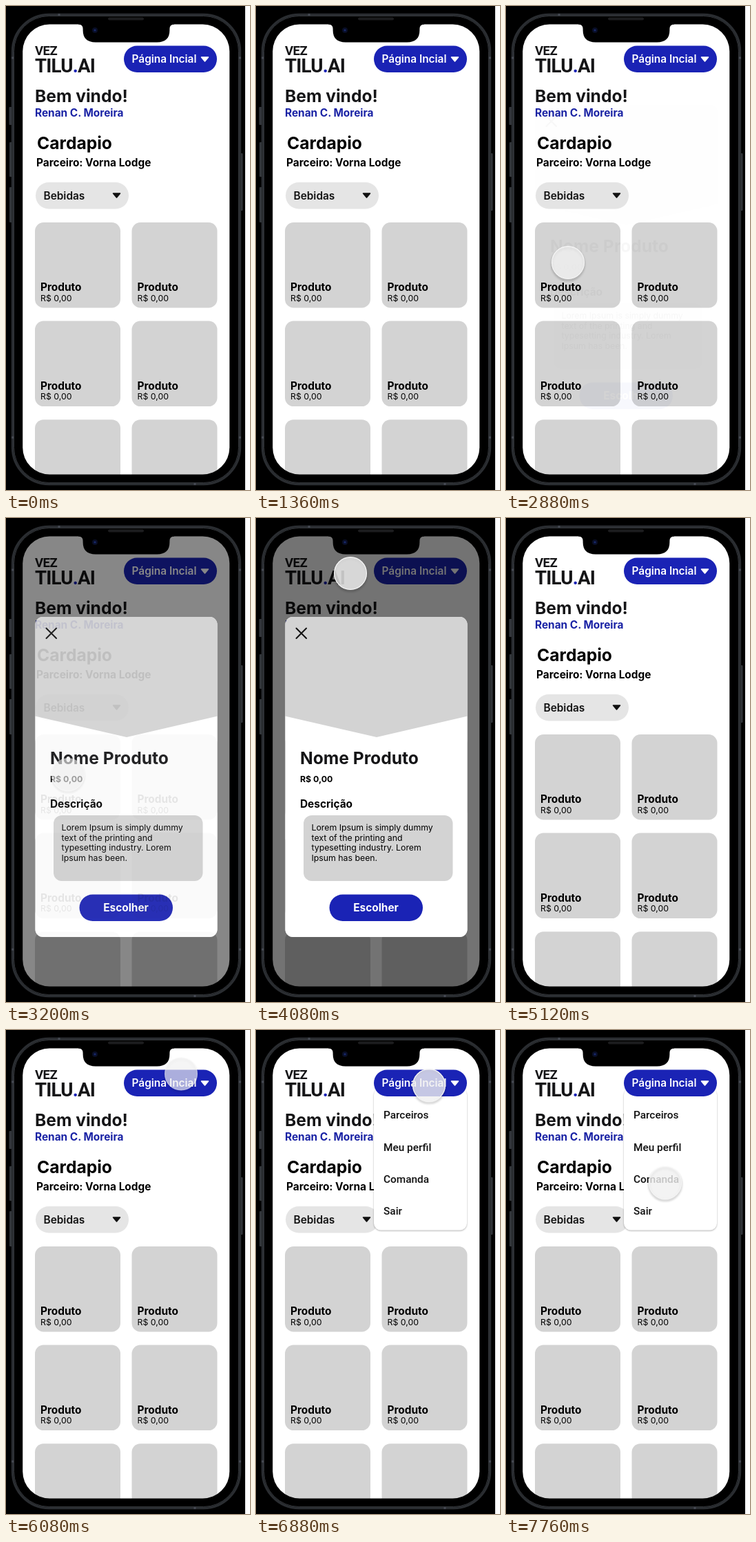
An HTML page for the animation above (8 s loop, 354 px wide and 700 px high).

```html
<!DOCTYPE html>
<html lang="pt">
<head>
<meta charset="utf-8">
<style>
  html, body { margin: 0; width: 100%; height: 100%; overflow: hidden; background: #000; }
  svg { display: block; font-family: Inter, sans-serif; }
  .title { font-size: 24.6px; font-weight: 700; fill: #151517; }
  .label { font-size: 15.4px; font-weight: 600; fill: #111; }
  .strong { font-weight: 700; fill: #000; }
  .small { font-size: 12.3px; fill: #000; }
  .logo { font-family: Roboto, sans-serif; font-weight: 600; fill: #151517; }
  .item { font: 500 15.4px Roboto, sans-serif; fill: #111; }
  .blue { fill: #1a23b5; }
  .white { fill: #fff; }
  .gray { fill: #d3d3d3; }
  #modal { mix-blend-mode: multiply; }
  #menuPanel { filter: drop-shadow(0 1.5px 1px rgba(0, 0, 0, .3)); }
  #disc { fill: rgba(240, 240, 240, .8); }
  #rim { fill: none; stroke: #fafafa; stroke-width: 1.3; }
  #shadow { fill: none; stroke: rgba(0, 0, 0, .28); stroke-width: 2; filter: blur(1.4px); }
</style>
</head>
<body>
<svg width="354" height="700" viewBox="0 0 354 700">
  <defs>
    <clipPath id="screenClip"><rect x="24.2" y="26.6" width="300.1" height="650.9" rx="39"/></clipPath>
    <clipPath id="modalClip"><rect x="42.5" y="143" width="264" height="463" rx="11"/></clipPath>
    <g id="card">
      <rect class="gray" width="124" height="123.5" rx="12.5"/>
      <text class="label strong" x="8" y="99">Produto</text>
      <text class="small" x="8" y="113.5">R$ 0,00</text>
    </g>
    <path id="arrow" d="M1 1H11L6 7Z" stroke-width="1.6" stroke-linejoin="round"/>
  </defs>

  <rect class="white" x="347" width="7" height="700"/>

  <!-- phone body -->
  <g fill="#33363b">
    <rect x="4.5" y="146" width="4" height="26" rx="1"/>
    <rect x="5" y="197" width="4" height="50" rx="1"/>
    <rect x="5" y="262" width="4" height="51" rx="1"/>
    <rect x="339.5" y="213" width="4" height="83" rx="1"/>
  </g>
  <rect x="9.5" y="12.5" width="330" height="679" rx="53" fill="#000" stroke="#2a2d31" stroke-width="3.4"/>
  <rect x="11.5" y="14.5" width="326" height="675" rx="51" fill="none" stroke="#34373b"/>
  <path d="M8 75h3M338 75h3M8 624h3M338 624h3M77 11v3M274 690v3" stroke="#454952" stroke-width="3"/>
  <rect x="148" y="16.5" width="52" height="4" rx="2" fill="#1c1c1e"/>

  <g clip-path="url(#screenClip)" style="isolation:isolate">
    <rect class="white" x="24" y="26" width="301" height="652"/>
    <text class="logo" x="42" y="71" font-size="18.5" letter-spacing="-.5">VEZ</text>
    <text class="logo" x="42" y="95.5" font-size="27.7" letter-spacing="-.85">TILU<tspan class="blue">.</tspan>AI</text>
    <text class="title" x="42" y="139">Bem vindo!</text>
    <text class="label strong" x="42" y="160" style="fill:#1a23a5">Renan C. Moreira</text>
    <text class="title" x="45" y="207" style="fill:#000">Cardapio</text>
    <text class="label strong" x="44" y="232">Parceiro: Vorna Lodge</text>
    <rect x="43" y="255" width="135" height="38.5" rx="19.2" fill="#e5e5e5"/>
    <text class="label" x="54.5" y="280">Bebidas</text>
    <use href="#arrow" x="154.5" y="270" fill="#111" stroke="#111"/>
    <g id="cards"></g>

    <g id="menu">
      <rect id="menuPanel" class="white" x="171" y="84" width="135" height="205.5" rx="10"/>
      <text class="item" x="185" y="128.3">Parceiros</text>
      <text class="item" x="185" y="174.5">Meu perfil</text>
      <text class="item" x="185" y="220.7">Comanda</text>
      <text class="item" x="185" y="267">Sair</text>
    </g>
    <rect class="blue" x="171" y="57.5" width="135" height="38.5" rx="19.2"/>
    <text class="label" x="182.5" y="82.3" style="fill:#fff">Página Incial</text>
    <use href="#arrow" x="282.5" y="73" fill="#fff" stroke="#fff"/>

    <path id="dim" fill-rule="evenodd" d="M24 26H325V678H24Z M53.5 143H295.5a11 11 0 0 1 11 11V595a11 11 0 0 1-11 11H53.5a11 11 0 0 1-11-11V154a11 11 0 0 1 11-11Z"/>
    <rect id="veil" class="white" x="42.5" y="143" width="264" height="463" rx="11"/>
    <g id="modal" clip-path="url(#modalClip)">
      <rect class="white" x="42" y="143" width="265" height="463"/>
      <path class="gray" d="M42 143H307V286.5L175 317L42 286.5Z"/>
      <path d="M58.5 159.5l14.5 14.5m0-14.5L58.5 174" stroke="#111" stroke-width="2" stroke-linecap="round"/>
      <text class="title" x="64" y="356">Nome Produto</text>
      <text class="small" x="64" y="381.7" font-weight="700">R$ 0,00</text>
      <text class="label strong" x="64" y="418.5">Descrição</text>
      <rect class="gray" x="69" y="430" width="216.5" height="95" rx="12"/>
      <text class="small">
        <tspan x="80.5" y="452">Lorem Ipsum is simply dummy</tspan>
        <tspan x="80.5" y="466.7">text of the printing and</tspan>
        <tspan x="80.5" y="481.4">typesetting industry. Lorem</tspan>
        <tspan x="80.5" y="496.1">Ipsum has been.</tspan>
      </text>
      <rect class="blue" x="106.5" y="544.5" width="135.5" height="38.5" rx="19.2"/>
      <text class="label strong" x="174" y="569" text-anchor="middle" style="fill:#fff">Escolher</text>
    </g>
  </g>

  <!-- notch -->
  <path d="M105 26.6Q111.6 27 111.6 33V35Q111.6 52.4 130 52.4H219Q237.4 52.4 237.4 35V33Q237.4 27 244 26.6V25H105Z"/>
  <circle cx="129" cy="35" r="4" fill="#090e26"/>
  <circle cx="129" cy="35" r="1.6" fill="#18296b"/>

  <g id="cursor">
    <g id="edge">
      <circle id="shadow" cy="2.2" r="23.3"/>
      <circle id="rim" r="23.4"/>
    </g>
    <circle id="disc" r="23.6"/>
  </g>
</svg>
<script>
const LOOP = 8000;
const $ = id => document.getElementById(id);

$('cards').innerHTML = [0, 1, 2].map(row => [0, 1].map(col =>
  `<use href="#card" x="${42 + col * 140.5}" y="${313 + row * 142.6}"/>`).join('')).join('');

const ease = p => p < .5 ? 2 * p * p : 1 - 2 * (1 - p) ** 2;
const ramp = (t, start, end) => ease(Math.min(1, Math.max(0, (t - start) / (end - start))));

// time, x, y, opacity
const cursorKeys = [
  [0, 90, 371, 0], [2520, 90, 371, 0], [2720, 90, 371, 1], [3050, 90, 371, 1], [3500, 90, 371, 0],
  [3700, 137, 80, 0], [3900, 137, 80, 1], [4250, 137, 80, 1], [4450, 137, 88, 1],
  [5000, 137, 88, 0], [5900, 258, 56, 0], [6080, 254, 63.5, .85],
  [6320, 251, 80, 1], [7160, 251, 80, 1], [7720, 231, 221, 1], [LOOP, 231, 221, 1]
];

function cursorAt(t) {
  const next = cursorKeys.findIndex(key => key[0] > t);
  const a = cursorKeys[next - 1], b = cursorKeys[next];
  const p = ramp(t, a[0], b[0]);
  return a.map((value, i) => value + (b[i] - value) * p);
}

function draw(t) {
  const open = ramp(t, 2820, 3280) - ramp(t, 4410, 4870);
  $('dim').setAttribute('opacity', .55 * open ** 2.5);
  $('veil').setAttribute('opacity', open ** 1.8);
  $('modal').setAttribute('opacity', open);
  $('menu').setAttribute('opacity', ramp(t, 6660, 6880));
  const [, x, y, opacity] = cursorAt(t);
  $('cursor').setAttribute('transform', `translate(${x} ${y})`);
  $('cursor').setAttribute('opacity', opacity);
  $('edge').setAttribute('opacity', opacity ** 3);
}

function frame() {
  draw(performance.now() % LOOP);
  requestAnimationFrame(frame);
}
frame();
</script>
</body>
</html>
```
